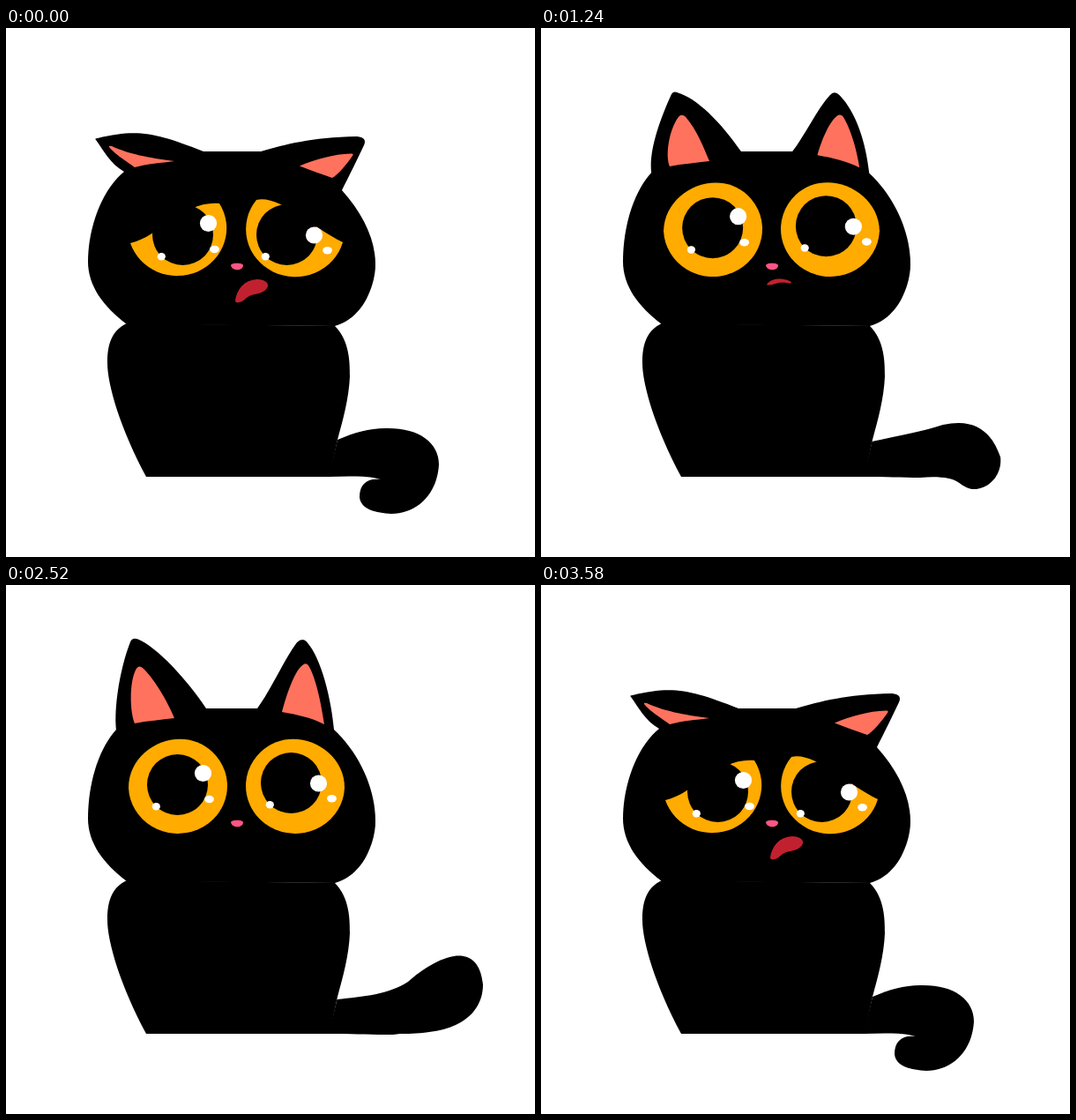
An HTML page that plays this animation: 600x600 px, repeating every 3.6 s.

```html
<!DOCTYPE html>
<html lang="en">
<head>
<meta charset="utf-8">
<title>Black cat</title>
<style>
  html, body { margin: 0; width: 100%; height: 100%; overflow: hidden; background: #fff; }
  svg { display: block; width: 100vw; height: 100vh; }
</style>
</head>
<body>
<svg viewBox="0 0 600 600">
  <path id="tail"/>
  <path id="body" d="M137 335C118 344 115 362 115 380C115 405 130 455 159 509L367 509L376 467C382 445 389 420 390 395C390 380 390 355 373 338Z"/>
  <path id="leftEar"/>
  <path id="rightEar"/>
  <path id="head"/>
  <g fill="#ff725e"><path id="leftInner"/><path id="rightInner"/></g>
  <g fill="#ffab00">
    <path id="leftEye"/>
    <path id="rightEye"/>
  </g>
  <g id="leftPupil">
    <circle cx="194.5" cy="226.5" r="34.5"/>
    <g fill="#fff">
      <circle cx="223.5" cy="213.5" r="9.6"/>
      <ellipse cx="170.3" cy="251.3" rx="4.6" ry="4.2"/>
      <ellipse cx="230.5" cy="243" rx="5.4" ry="4.2"/>
    </g>
  </g>
  <g id="rightPupil">
    <circle cx="323.5" cy="224.5" r="34.5"/>
    <g fill="#fff">
      <circle cx="354.5" cy="225" r="9.6"/>
      <ellipse cx="299.3" cy="249.2" rx="4.6" ry="4.2"/>
      <ellipse cx="369.5" cy="242.2" rx="5.4" ry="4.2"/>
    </g>
  </g>
  <path fill="#ff5584" d="M255 269C256 266 268 266 269 269C269 276 256 276 255 269Z"/>
  <path id="mouth" fill="#c1212f"/>
</svg>
<script>
const LOOP = 3600;
const $ = id => document.getElementById(id);

// Each face part: sad pose, happy pose
const face = {
  head: [
    'M134 163L224 140L289 140L381 184C405 211 419 240 419 268C419 275 418 280 417 285C411 310 397 331 373 338L137 336C110 316 93 292 93 265C93 225 110 182 134 163Z',
    'M125 164L227 140L285 140L372 164C400 190 419 230 419 268C419 275 418 280 417 285C411 310 397 331 373 338L137 336C110 316 93 292 93 265C93 225 105 186 125 164Z'],
  leftEye: [
    'M141 244C176 236 200 196 242 199A56 54 0 1 1 141 244Z',
    'M139 230C139 183.2 199.2 156.6 234 189.2A56 54 0 1 1 139 230Z'],
  rightEye: [
    'M284 195C310 189 345 225 382 243A56 54 0 1 1 284 195Z',
    'M289 189.2C323.8 156.6 384 183.2 384 230A56 54 0 1 1 289 189.2Z'],
  mouth: [
    'M260 309C262 296 270 286 285 285C293 285 298 289 297 293C295 299 288 301 280 302.5C271 305 271 310 265 311C262 312 260 311 260 309Z',
    'M256 290.5C259 286 265 284.5 271 284.5C278 285 283 287 284 289C282 290 277 288 271 288.5C264 290 262 291 259 291C257 291 256 291 256 290.5Z']
};

// Each ear part: drooping, raised, perked
const ears = {
  leftEar: [
    'M134 163C118 154 110 138 102 127Q100 125 104 125C150 114 170 119 224 140L200 190Z',
    'M125 165C122 140 135 104 149 74Q151 70 156 72C178 79 205 107 227 140L200 190Z',
    'M125 165C122 140 129 94 141 64Q143 59 149 61C171 70 205 107 227 140L200 190Z'],
  rightEar: [
    'M289 140C318 132 345 124 398 123Q410 124 406 133C399 148 389 168 381 184L320 190Z',
    'M285 140C298 123 313 90 326 75Q331 69 337 75C357 95 368 130 372 164L320 190Z',
    'M285 140C300 120 317 82 330 65Q336 59 341 64C358 83 369 130 372 164L320 190Z'],
  leftInner: [
    'M146 158C139 153 122 142 117 135Q116 133 120 134C140 143 160 147 191 151C176 153 160 154 146 158Z',
    'M146 157C141 146 145 116 157 100Q160.500 96 165 100C178 115 186 138 191 151C176 153 160 154 146 157Z',
    'M146 157C141 146 139 112 147 96Q150 90 155 94C170 108 186 138 191 151C176 153 160 154 146 157Z'],
  rightInner: [
    'M333 156.5C350 149 372 143 391 142.5Q395 142 393 145C387 154 376 167 370 170C358 166 345 161 333 156.5Z',
    'M313 144C318 125 326 106 334 99Q338 96 341 99C350 112 358 138 361 158C345 150 330 147 313 144Z',
    'M313 144C318 125 327 98 336 91Q340 87 343 91C352 105 358 138 361 158C345 150 330 147 313 144Z']
};

const curl = 'M376 467C395 459 412 454 430 454C468 453 491 470 491 495C489 530 465 551 437 551C420 550 402 546 401 532C401 517 410 510 425 512C415 508 390 508 366 509Z';
const loose = 'M376 468C395 460 418 454 436 454.5C475 453 495 472 495 498C493 528 470 546 446 546C430 546 416 540 416 527C416 512 417 512 425 511C412 508 390 508 366 509Z';
const low = 'M375.5 469C408 462 435 457 456 450C492 442 511 458 521 487C523 506 510 521 494 523C486 524 480 520 473 515C466 510 450 508 430 510C410 510 390 509 366 509Z';
const dip = 'M376 469C408 462 435 453 453 452C490 449 508 468 516 493C519 515 505 533 485 535C475 533 471 529 467 520C463 510 450 508 430 510C410 510 390 509 366 509Z';
const lifted = 'M375.5 470C405 467 435 464 456 450C485 424 535 398 541 453C541 480 522 502 480 507C465 509 455 509 447 509C442 510 436 510 430 510C410 510 390 509 366 509Z';

const linear = x => x;
const easeIn = x => x * x;
const easeOut = x => x * (2 - x);
const wave = x => (1 - Math.cos(Math.PI * x)) / 2;

// time, pose, easing towards the next pose
const tailKeys = [
  [0, curl, linear], [640, curl, easeIn], [880, loose, linear], [1240, low, easeOut],
  [1560, lifted, linear], [2860, lifted, easeIn], [3220, low, linear],
  [3300, dip, linear], [3580, curl, linear], [LOOP, curl, linear]
];

const ramp = (t, from, to) => Math.min(1, Math.max(0, (t - from) / (to - from)));

function mix(a, b, k) {
  const target = b.match(/[\d.]+/g);
  let i = 0;
  return a.replace(/[\d.]+/g, n => {
    const v = +n + (target[i++] - n) * k;
    return Math.round(v * 1000) / 1000;
  });
}

function tailAt(t) {
  const i = tailKeys.findIndex(key => key[0] > t) - 1;
  const [from, pose, ease] = tailKeys[i];
  const [to, next] = tailKeys[i + 1];
  return mix(pose, next, ease(ramp(t, from, to)));
}

function draw(t) {
  const joy = wave(ramp(t, 700, 1300)) - ramp(t, 2790, 3580);
  const droop = t < 540 ? 0.03 * wave(t / 135) : 0;
  const perk = t > 1400 && t < 2720 ? wave((t - 1400) / 220) : 0;

  for (const id in face) $(id).setAttribute('d', mix(...face[id], joy));
  for (const id in ears) {
    const [sad, up, high] = ears[id];
    $(id).setAttribute('d', mix(mix(sad, up, joy - droop), high, perk));
  }
  $('tail').setAttribute('d', tailAt(t));
  $('mouth').style.display = joy > 0.995 ? 'none' : '';

  const sad = 1 - joy;
  $('leftPupil').setAttribute('transform', `translate(${6 * sad} ${8 * sad})`);
  $('rightPupil').setAttribute('transform', `translate(${-5 * sad} ${10 * sad})`);
}

function tick(now) {
  draw(now % LOOP);
  requestAnimationFrame(tick);
}
draw(0);
requestAnimationFrame(tick);
</script>
</body>
</html>
```
